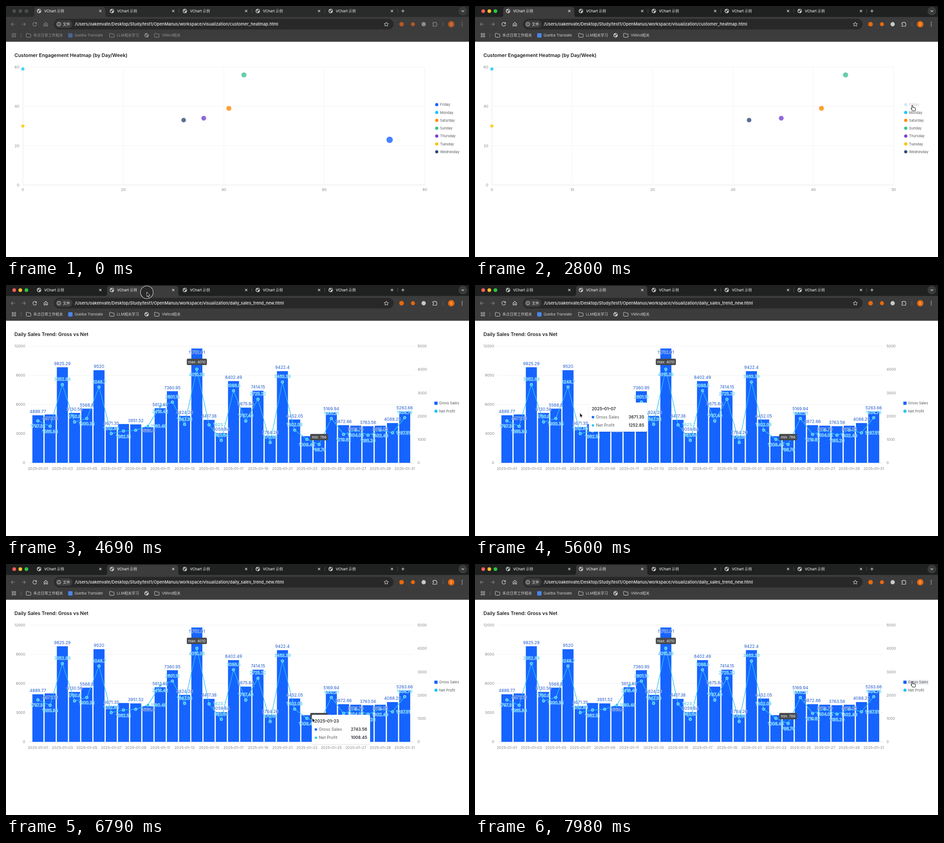
Animation, 1016 px wide and 551 px high, one loop 8 s. Source, as an HTML page:

```html
<!DOCTYPE html>
<html lang="zh">
<head>
<meta charset="utf-8">
<title>Chart tabs</title>
<style>
html, body { margin: 0; width: 100%; height: 100%; overflow: hidden; background: #fff; }
svg { display: block; width: 1016px; height: 551px; font-family: Inter, "Noto Sans CJK SC", "Noto Sans CJK", sans-serif; }
text { white-space: pre; }
</style>
</head>
<body>
<svg id="stage" viewBox="0 0 1016 551"></svg>
<script>
const LOOP = 8000, STEP = 70;
const ACTIVATE = 1890, HIDE = 2310, SHOW = 3150, SWITCH = 4620;
const CLICKS = [ACTIVATE, HIDE, SHOW, SWITCH];
const BLUE = '#1664ff', CYAN = '#2bc3f4';

// arrival time, x, y and, after a rest, the travel time
const PATH = [
  [350, 495, 605], [700, 280, 322], [1470, 910, 217, 280], [1750, 960, 218, 140], [4200, 322, 34, 420],
  [4480, 309, 16], [5600, 230, 281, 560], [5880, 152, 160], [6090, 460, 175], [6160, 500, 205],
  [6720, 661, 321], [6790, 672, 338], [7000, 780, 335], [7490, 692, 298], [7910, 960, 258]
];

// name, colour, x, y
const BUBBLES = [
  ['Friday', BLUE, 73, 23], ['Monday', '#1ac6ff', 0, 59], ['Saturday', '#ff8a00', 41, 39],
  ['Sunday', '#3fc28e', 44, 56], ['Thursday', '#7442d4', 36, 34], ['Tuesday', '#ffc400', 0, 30],
  ['Wednesday', '#304d77', 32, 33]
];

const SALES = [4889.77, 4972.16, 9825.29, 5130.56, 5568.8, 9520, 3671.35, 3990.12, 3951.52, 3668.6, 5613.62,
  7360.95, 4824.28, 11752.01, 4417.38, 3059.84, 8402.49, 5675.84, 7414.15, 2764.26, 9422.4, 4452.05, 2743.56,
  2498.3, 5169.94, 3872.66, 3819.79, 3763.56, 3815.55, 4088.25, 5263.66];

// a steady margin with one bump, swinging from day to day at both ends of the month
function margin(day) {
  const bump = .115 * Math.exp(-((day - 10.5) ** 2));
  const swing = day < 3 || day > 14 ? .02632 * (day % 2 ? 1 : -1) : 0;
  return .34125 + bump + swing;
}
const PROFIT = SALES.map((v, i) => +(v * margin(i + 1)).toFixed(2));

const clamp = v => Math.max(0, Math.min(1, v));
const mix = (a, b, k) => a + (b - a) * k;
const ease = v => 1 - (1 - clamp(v)) ** 3;
const each = (n, f) => Array.from({ length: n }, (_, i) => f(i)).join('');

const text = (x, y, s, size, fill, more = '') =>
  `<text x="${x}" y="${y + size * .36}" font-size="${size}" fill="${fill}" ${more}>${s}</text>`;
const rect = (x, y, w, h, fill, r = 0, more = '') =>
  `<rect x="${x}" y="${y}" width="${w}" height="${h}" rx="${r}" fill="${fill}" ${more}/>`;
const dot = (x, y, r, fill, more = '') => `<circle cx="${x}" cy="${y}" r="${r}" fill="${fill}" ${more}/>`;
const line = (d, color, w = 1, more = '') =>
  `<path d="${d}" fill="none" stroke="${color}" stroke-width="${w}" ${more}/>`;
const MID = 'text-anchor="middle"', END = 'text-anchor="end"';
const MEDIUM = 'font-weight="500"', BOLD = 'font-weight="600"';

function pointer(t) {
  if (t <= PATH[0][0]) return null;
  const i = PATH.findIndex(p => p[0] >= t);
  if (i < 0) return PATH[PATH.length - 1].slice(1, 3);
  const a = PATH[i - 1], b = PATH[i], travel = b[3] || b[0] - a[0];
  const k = clamp(1 - (b[0] - t) / travel);
  return [mix(a[1], b[1], k), mix(a[2], b[2], k)];
}

const inside = (p, x1, y1, x2, y2) => p && p[0] >= x1 && p[0] <= x2 && p[1] >= y1 && p[1] <= y2;

function globe(x, y, color, hole) {
  return dot(x, y, 4.8, color) +
    `<path d="M${x - 3.6} ${y - 1.2}l3 .4 1.6 1.6-1.4 1.2-.3 1.8-1.5-.8-.5-1.9zM${x + .2} ${y - 3.6}l2.6 1 .9 2.2-1.6.4-1.4-1.5-1.1-.3z" fill="${hole}"/>`;
}

const folder = (x, c) =>
  line(`M${x} 61q0-1 1-1h2.6l1.4 1.5h4q1 0 1 1v5q0 1-1 1h-8q-1 0-1-1z`, c);

function tabs(p, active, tab, bar, strip) {
  const title = active ? '#e6e6e6' : '#dedede';
  let s = rect(0, 0, 1016, 24, strip);
  ['#ff5f57', '#febc2e', '#28c840'].forEach((c, i) => s += dot(18 + i * 13.4, 11.2, 4, active ? c : '#4d4d4d'));
  for (let i = 0; i < 5; i++) {
    const x = 62 + i * 160, on = i === tab;
    if (on) s += `<path d="M${x - 5} 24q5 0 5-5v-11q0-6 6-6h144q6 0 6 6v11q0 5 5 5z" fill="${bar}"/>`;
    else if (active && inside(p, x, 1, x + 156, 23)) s += rect(x + 1, 3, 154, 17, '#303131', 5);
    s += globe(x + 10.5, 11, '#c4c4c4', on ? bar : strip);
    s += text(x + 21.7, 10.8, 'VChart 示例', 7.85, title, MEDIUM);
    s += line(`M${x + 142.6} 8.6l4.8 4.8m0-4.8l-4.8 4.8`, title, 1.1);
    if (!on && i + 1 !== tab) s += line(`M${x + 157.5} 6.5v9`, '#4a4b4b');
  }
  return s + line('M871 7.5v7m-3.5-3.5h7', title, 1.1) +
    dot(1002.5, 11, 9.5, '#3a3b3b') + line('M999.7 9.7l2.8 2.8 2.8-2.8', title, 1.2);
}

function toolbar(p, active, tab, bar) {
  const icon = active ? '#d6d6d6' : '#8d8d8d', weak = active ? '#858585' : '#7c7c7c';
  let s = line('M19.5 40h-8m3.5-3.6l-3.6 3.6 3.6 3.6M34.5 40h8m-3.5-3.6l3.6 3.6-3.6 3.6', weak, 1.1);
  s += line('M66.6 38.2a4 4 0 1 0 .4 2.6M67 36v2.6h-2.7', icon, 1.1);
  s += line('M83.5 39.3l3.8-3.3 3.8 3.3v4.7h-2.5v-3h-2.6v3h-2.5z', icon, 1.1);

  if (!(active && inside(p, 106, 28, 850, 52)))
    s += rect(105.5, 28.3, 745, 23.2, '#282828', 11.6) + rect(108.5, 31.3, 37.5, 17, bar, 8.5);
  s += dot(116, 40, 4, 'none', 'stroke="#e0e0e0"') + line('M116 39.5v2.6M116 37.4v1.1', '#e0e0e0');
  s += text(124.7, 39.8, '文件', 8, '#e8e8e8', MEDIUM);
  const file = tab ? 'daily_sales_trend_new' : 'customer_heatmap';
  s += text(151, 39.8, `/Users/oakenvate/Desktop/Study/test1/OpenManus/workspace/visualization/${file}.html`, 9.2, '#ececec', MEDIUM);
  s += line('M834.5 35.4l1.4 3 3.3.4-2.4 2.2.6 3.2-2.9-1.6-2.9 1.6.6-3.2-2.4-2.2 3.3-.4z', '#dcdcdc');

  const orange = active ? '#e8690b' : '#b4571f';
  s += dot(868, 40, 5, orange) + dot(893, 40, 4.4, orange) + dot(916.5, 40, 4.7, active ? '#c9c9c9' : '#8e8e8e');
  s += line('M936.8 36.6h2.8a1.4 1.4 0 0 1 2.8 0h2.4v2.6a1.5 1.5 0 0 1 0 2.9v2.4h-8v-2.3a1.4 1.4 0 0 0 0-3z', icon, 1.1);
  s += line('M959 35.5v9', '#666');
  s += dot(977, 40, 7, orange) + text(977, 39.8, '安', 5.5, active ? '#ffe3cc' : '#dcb79c', MID);
  return s + each(3, i => dot(1001, 36.3 + i * 3.7, 1, icon));
}

function bookmarks(active, bar) {
  const icon = active ? '#d6d6d6' : '#8d8d8d', mark = active ? '#cfcfcf' : '#929292';
  const label = (x, s, size = 8.1) => text(x, 64, s, size, mark);
  return each(4, i => rect(13.3 + i % 2 * 5, 60.2 + (i >> 1) * 5, 3, 3, 'none', .4, `stroke="${icon}" stroke-width=".9"`)) +
    line('M33 60v9', '#6a6a6a') +
    folder(44.5, mark) + label(60, '禾点日常工作相关') +
    rect(136.5, 59.7, 9.5, 9.5, active ? '#4a86e8' : '#4a6594', 1) + label(150.3, 'Quelba Translate', 7.8) +
    folder(227.3, mark) + label(243, 'LLM相关学习') +
    globe(308.5, 64.3, mark, bar) +
    folder(326, mark) + label(342, 'VMind相关');
}

function browser(p, active, tab) {
  const bar = '#3c3c3c', strip = active ? '#1f2020' : '#292a2a';
  return rect(0, 0, 1016, 78.5, bar) + tabs(p, active, tab, bar, strip) +
    toolbar(p, active, tab, bar) + bookmarks(active, bar);
}

const heading = s => text(18.5, 107.7, s, 10.75, '#1c1f23', BOLD);
const AXIS = '#85878b', INK = '#54585e';

function bubbleChart(t) {
  const off = t >= HIDE && t < SHOW;
  const k = ease((t - HIDE + STEP) / 560) - ease((t - SHOW + STEP) / 560);
  const px = v => 37 + v * 882 / mix(80, 50, k), py = v => 393 - v * 4.317;
  let s = heading('Customer Engagement Heatmap (by Day/Week)');
  for (let v = 0; v <= 60; v += 20) {
    s += line(`M37 ${py(v)}H919`, v ? '#f1f2f3' : '#e3e5e8');
    s += text(29, py(v), v, 8.1, AXIS, END);
  }
  for (let v = 0; v <= 80; v += 10) {
    const alpha = v % 20 ? k : v > 40 ? 1 - k : 1;
    if (alpha <= 0 || px(v) > 960) continue;
    s += `<g opacity="${alpha}">` + (px(v) < 919 ? line(`M${px(v)} 134V393`, v ? '#f3f4f5' : '#e6e8ea') : '') +
      text(px(v), 402.6, v, 8.1, AXIS, MID) + '</g>';
  }
  s += line('M919 134V393', '#eff0f1');
  BUBBLES.forEach(([name, color, x, y], i) => {
    const alpha = i ? 1 : 1 - k, ly = 216.6 + i * 17.25, dim = !i && off;
    if (alpha > 0 && px(x) < 930) s += dot(px(x), py(y), (3.5 + x * .048) * alpha, color, `opacity="${.8 * alpha}"`);
    s += dot(945.2, ly, 3.5, dim ? '#cfe9fb' : color);
    s += text(952.6, ly, name, 7.65, dim ? '#c3c6ca' : INK);
  });
  return s;
}

const dayX = i => 70 + i * 26.83;
const barY = v => 390.4 - v * .02136, profitY = v => 390.4 - v * .05126;
const date = i => '2025–01–' + String(i + 1).padStart(2, '0');

// takes the first free spot among the offsets, or none
function place(taken, x, y, offsets) {
  const free = ([dx, dy]) => y + dy > 134 && taken.every(b =>
    Math.abs(b.x - x - dx) >= 36 || Math.abs(b.y - y - dy) >= (b.h + 9.3) / 2);
  const spot = offsets.find(free);
  if (!spot) return null;
  const box = { x: x + spot[0], y: y + spot[1], h: 9.3 };
  taken.push(box);
  return box;
}

const comboChart = (() => {
  let s = heading('Daily Sales Trend: Gross vs Net');
  for (let i = 0; i < 5; i++) {
    const y = barY(i * 3000);
    s += line(`M50 ${y}H895`, i ? '#f1f2f3' : '#dfe1e4') + text(42, y, i * 3000, 8.1, AXIS, END);
  }
  s += each(6, i => text(903, profitY(i * 1000), i * 1000, 8.1, AXIS));
  s += each(16, i => text(dayX(i * 2), 402.6, date(i * 2), 8.1, AXIS, MID));
  SALES.forEach((v, i) => s += rect(dayX(i) - 12.1, barY(v), 24.2, 390.4 - barY(v), BLUE));
  s += line('M' + PROFIT.map((v, i) => `${dayX(i)} ${profitY(v)}`).join('L'), CYAN, 1.3, 'stroke-linejoin="round"');
  PROFIT.forEach((v, i) => s += dot(dayX(i), profitY(v), 3, CYAN, 'stroke="#c9effc" stroke-width=".9"'));

  const badges = ['max', 'min'].map(kind => {
    const v = Math[kind](...PROFIT), x = dayX(PROFIT.indexOf(v));
    return { x, y: profitY(v) - 16, h: 14, label: `${kind}: ${Math.floor(v)}` };
  });
  const taken = [...badges];
  const labels = (data, toY, color, offsets) => data.forEach((v, i) => {
    const box = place(taken, dayX(i), toY(v), offsets);
    if (box) s += text(box.x, box.y, v, 9.25, color, `${MID} stroke="#fff" stroke-opacity=".8" paint-order="stroke"`);
  });
  labels(SALES, barY, '#2059cc', [[0, -8], [0, 8]]);
  labels(PROFIT, profitY, '#22bff3', [[0, -11.7], [0, 11.7], [23.5, 0], [-25.5, 0]]);
  for (const { x, y, label } of badges) {
    const w = label.length * 4.9;
    s += rect(x - w / 2, y - 7, w, 14, '#47494c', 2.5) + text(x, y, label, 7.85, '#fff', MID);
  }
  return s;
})();

function comboLegend(p) {
  const hover = inside(p, 938, 252, 997, 266) ? rect(948.5, 254, 47, 11.5, '#eff0f2') : '';
  return hover + rect(940, 256, 7, 7, BLUE) + text(950.6, 259.6, 'Gross Sales', 7.8, INK) +
    dot(943.5, 277, 3.5, CYAN) + text(950.6, 277, 'Net Profit', 7.8, INK);
}

function tooltip(t, p) {
  if (!inside(p, 56, 134, 890, 390)) return '';
  // the box trails the pointer by one step
  const from = pointer(t - STEP), x = from[0] + 10, y = Math.max(134, from[1] + 10);
  const i = Math.round(clamp((p[0] - 70) / 805) * 30);
  const row = (dy, name, value) => text(x + 15.5, y + dy, name, 9.1, '#5d6167') +
    text(x + 121.5, y + dy, value, 9, '#2b2e33', `${BOLD} ${END}`);
  return rect(x - 1, y + 1, 130, 66, '#000', 4, 'opacity=".05"') + rect(x, y, 128, 64, '#fff', 3) +
    text(x + 6.3, y + 14, date(i), 9.1, '#2b2e33', BOLD) +
    rect(x + 6.5, y + 29.7, 5, 5, BLUE) + row(32, 'Gross Sales', SALES[i]) +
    dot(x + 9, y + 50.3, 2.6, CYAN) + row(50, 'Net Profit', PROFIT[i]);
}

const ROUND = 'stroke-linejoin="round" stroke-linecap="round"';
const shape = (d, fill, stroke, w) => `<path d="${d}" fill="${fill}" stroke="${stroke}" stroke-width="${w}" ${ROUND}/>`;
const BEAM = 'M-2.4-5.5q2 0 2.4 1.2q.4-1.2 2.4-1.2M0-4.5v9M-2.4 5.5q2 0 2.4-1.2q.4 1.2 2.4 1.2M-1.2 1.6h2.4';
const POINTERS = {
  beam: shape(BEAM, 'none', '#eee', 2.2) + shape(BEAM, 'none', '#222', .9),
  hand: '<g transform="scale(1.15)">' + shape('M-1.2 1q0-1 .9-1t1 1v3.2q1.5-.6 1.9.3 1.3-.5 1.7.4 1.4-.2 1.4 1.2v1.7q0 1.3-.8 2.9h-4.6q-1.6-1.8-2.9-4.2-.3-1.2.9-.9l.5.7z', '#fff', '#222', .9) + '</g>',
  arrow: shape('M0 0v9.6l2.2-2 1.5 3.4 1.6-.7-1.5-3.3h3z', '#111', '#fff', .8)
};

function cursor(t, p, active, tab) {
  if (!p) return '';
  let s = `<g transform="translate(${p[0]} ${p[1]})">`;
  for (const c of CLICKS) {
    const age = t - c, r = 12 + age / 35;
    if (age < 0 || age >= 210) continue;
    s += `<g opacity="${age > STEP ? .5 : 1}">` + dot(0, 0, r + 1, 'none', 'stroke="#222" stroke-opacity=".5"') +
      dot(0, 0, r, '#000', 'fill-opacity=".3" stroke="#d8d8d8" stroke-width="1.1"') + '</g>';
  }
  const legend = tab ? inside(p, 938, 252, 997, 284) : inside(p, 938, 210, 997, 326);
  const kind = active && inside(p, 150, 28, 830, 52) ? 'beam' : active && legend ? 'hand' : 'arrow';
  return s + POINTERS[kind] + '</g>';
}

function scene(t) {
  const p = pointer(t), active = t >= ACTIVATE, tab = t >= SWITCH ? 1 : 0;
  const page = tab ? comboChart + comboLegend(p) + tooltip(t, p) : bubbleChart(t);
  return rect(0, 0, 1016, 551, '#fff') + page + browser(p, active, tab) + cursor(t, p, active, tab);
}

const stage = document.getElementById('stage');
const start = performance.now();
let shown = -1;

function tick() {
  const t = Math.floor((performance.now() - start) % LOOP / STEP) * STEP;
  if (t !== shown) stage.innerHTML = scene(shown = t);
  requestAnimationFrame(tick);
}
tick();
</script>
</body>
</html>
```
